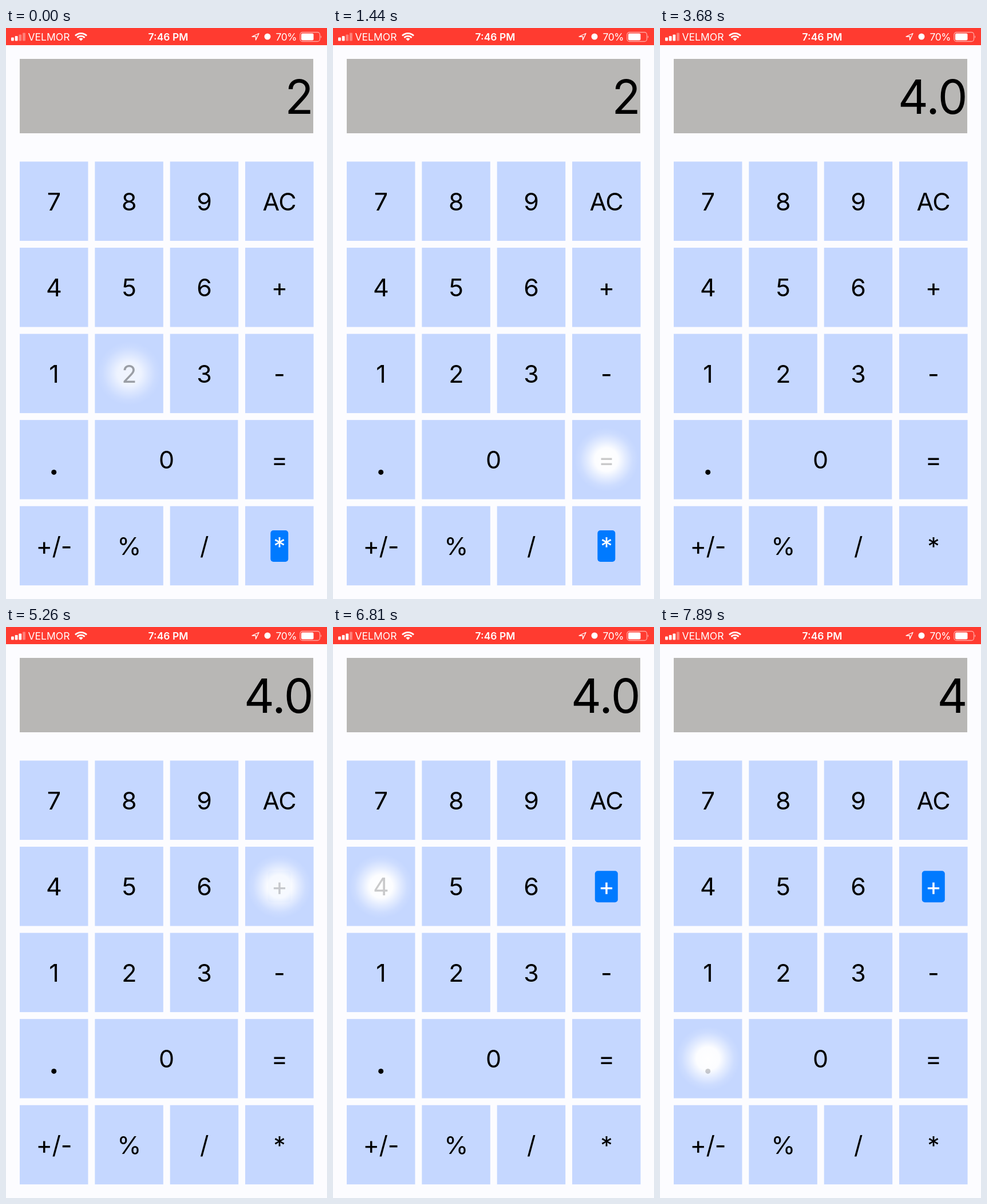
Recreate the animation shown at these times as an HTML page. Size 561 by 998 pixels, loop 7990 ms.

```html
<!DOCTYPE html>
<html lang="en">
<head>
<meta charset="utf-8">
<title>Calculator</title>
<style>
  html, body { margin: 0; width: 100%; height: 100%; overflow: hidden; background: #fcfcff; }
  svg { display: block; width: 561px; height: 998px; font-family: Inter, Roboto, sans-serif; }
  .key { font-size: 43px; letter-spacing: -.4px; text-anchor: middle; }
  .status { fill: #fff; font-size: 17.5px; }
</style>
</head>
<body>
<svg viewBox="0 0 561 998">
  <defs>
    <radialGradient id="glow">
      <stop offset="0" stop-color="#fff"/>
      <stop offset=".36" stop-color="#fff" stop-opacity=".95"/>
      <stop offset=".6" stop-color="#fff" stop-opacity=".5"/>
      <stop offset=".82" stop-color="#fff" stop-opacity=".14"/>
      <stop offset="1" stop-color="#fff" stop-opacity="0"/>
    </radialGradient>
  </defs>
  <rect width="561" height="998" fill="#fcfcff"/>
  <rect width="561" height="30" fill="#ff3b30"/>
  <g class="status">
    <g id="signal"></g>
    <text x="38.5" y="22">VELMOR</text>
    <path d="M121 13.5A14 14 0 0 1 141 13.5M124.5 17A9 9 0 0 1 137.500 17" fill="none" stroke="#fff" stroke-width="2.8"/>
    <path d="M131 22.500l-3.600-3.600a5.100 5.100 0 0 1 7.200 0z"/>
    <text x="283.500" y="21.500" font-weight="600" text-anchor="middle">7:46 PM</text>
    <path d="M442 9.500L430 15h6.500v6z" fill="none" stroke="#fff" stroke-width="1.300" stroke-linejoin="round"/>
    <circle cx="457" cy="15" r="5.500"/>
    <text x="471.500" y="22" letter-spacing="-.4">70%</text>
    <rect x="514" y="7.500" width="34.500" height="16" rx="4" fill="none" stroke="#fff" stroke-opacity=".55" stroke-width="1.300"/>
    <rect x="516" y="9.500" width="21.500" height="12" rx="2"/>
    <path d="M550 13q2.500 2.500 0 5z" opacity=".6"/>
  </g>
  <rect x="24" y="54" width="513" height="130" fill="#b8b7b5"/>
  <text id="display" x="536.500" y="149.500" font-size="82" letter-spacing="-1" text-anchor="end"></text>
  <g id="keys" class="key"></g>
</svg>
<script>
const LOOP = 7990;
const PRESSES = { '2': -270, '=': 1440, '+': 5110, '4': 6810, '.': 7890 };
const ROWS = [['7', '8', '9', 'AC'], ['4', '5', '6', '+'], ['1', '2', '3', '-'],
              ['.', '0', null, '='], ['+/-', '%', '/', '*']];
const byId = id => document.getElementById(id);
const keys = {};

function add(parent, tag, attrs, text = '') {
  const node = document.createElementNS('http://www.w3.org/2000/svg', tag);
  for (const name in attrs) node.setAttribute(name, attrs[name]);
  node.textContent = text;
  return parent.appendChild(node);
}

function addKey(label, col, row) {
  const x = 24 + col * 131.35, y = 233.5 + row * 150.55;
  const width = label === '0' ? 250 : 119.5;
  const cx = x + width / 2, cy = y + 69.25;
  const group = byId('keys');
  const key = keys[label] = {};
  add(group, 'rect', { x, y, width, height: 138.5, fill: '#c5d7ff' });
  key.glow = add(group, 'circle', { cx, cy, r: 56, fill: 'url(#glow)', opacity: 0 });
  if (label === '+' || label === '*') {
    const w = label === '+' ? 40 : 31;
    key.box = add(group, 'rect', { x: cx - w / 2, y: cy - 27, width: w, height: 55, rx: 5, fill: '#007aff' });
    key.light = add(group, 'text', { x: cx, y: cy + 16, fill: '#fff' }, label);
  }
  key.label = label === '.'
    ? add(group, 'circle', { cx, cy: cy + 22, r: 4.5 })
    : add(group, 'text', { x: cx, y: cy + 16 }, label);
}

ROWS.forEach((row, r) => row.forEach((label, c) => label && addKey(label, c, r)));
const bars = [6, 8.5, 11, 14].map((height, i) =>
  add(byId('signal'), 'rect', { x: 9 + i * 6.7, y: 22.5 - height, width: 4.8, height, rx: 1 }));

const clamp = v => Math.max(0, Math.min(1, v));
const smooth = v => { v = clamp(v); return v * v * (3 - 2 * v); };
const opacity = (node, value) => node.setAttribute('opacity', value);

function render(t) {
  for (const label in PRESSES) {
    const age = t - PRESSES[label], key = keys[label];
    const release = smooth((age - 100) / 620);
    opacity(key.glow, age < 0 ? 0 : (1 - release) ** 1.4);
    opacity(key.label, age < 0 ? 1 : .2 + .8 * release);
  }

  const plus = smooth((t - PRESSES['+'] - 100) / 600);
  opacity(keys['+'].box, plus);
  opacity(keys['+'].light, plus * plus);
  if (t >= PRESSES['+']) opacity(keys['+'].label, .2 * (1 - plus));

  const times = 1 - smooth((t - PRESSES['='] - 50) / 500);
  opacity(keys['*'].box, times);
  opacity(keys['*'].light, times);
  opacity(keys['*'].label, 1 - times * times);

  byId('display').textContent = t < 1540 ? '2' : t < 6910 ? '4.0' : '4';
  const strength = t < 3630 ? 2 : 3;
  bars.forEach((bar, i) => opacity(bar, i < strength ? 1 : .35));
}

const start = performance.now();
function tick() {
  render((performance.now() - start) % LOOP);
  requestAnimationFrame(tick);
}
tick();
</script>
</body>
</html>
```
